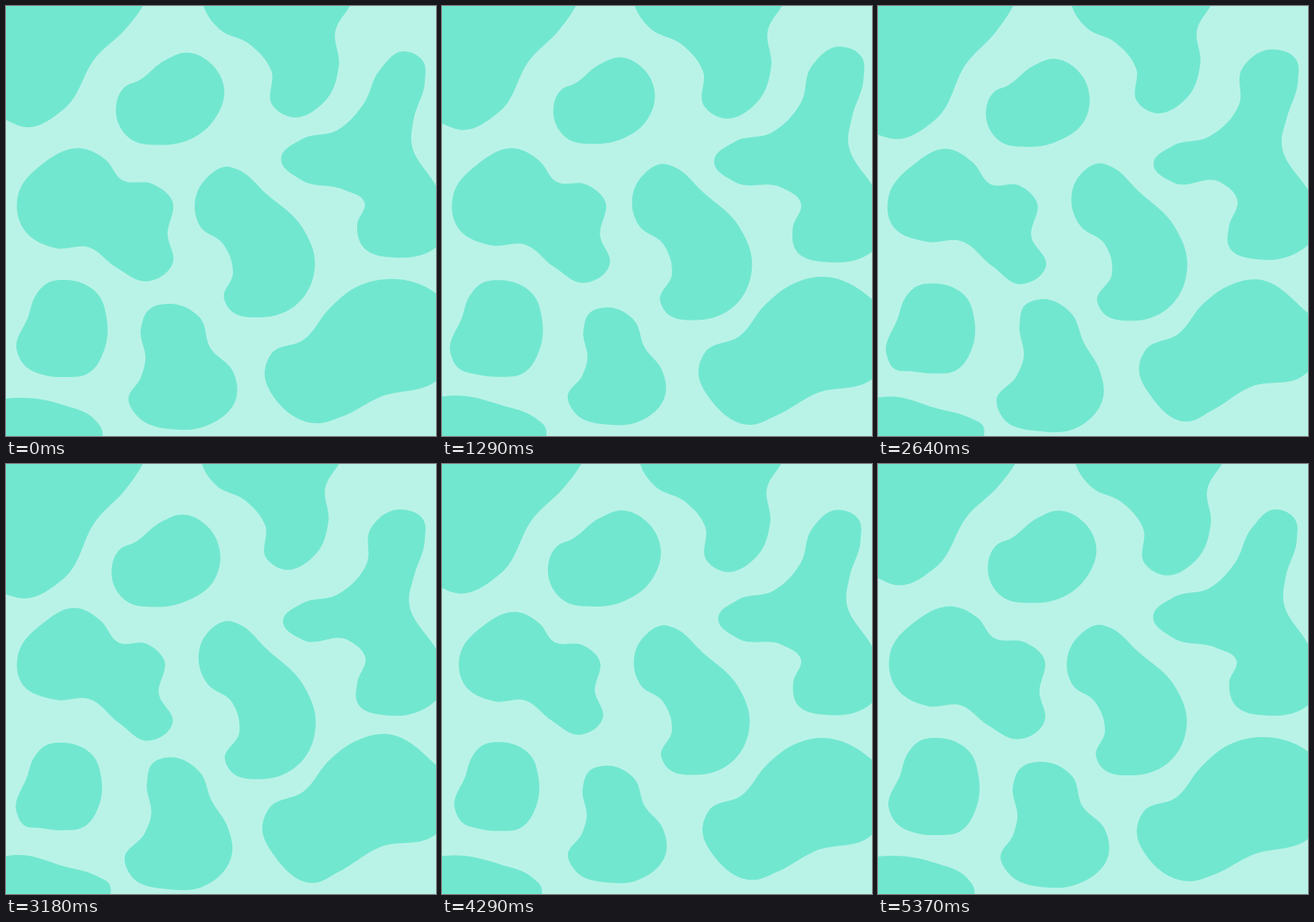
An HTML page with a canvas that plays this animation: 540 by 540 pixels, repeating every 5.4 s.

```html
<!DOCTYPE html>
<html lang="en">
<head>
<meta charset="utf-8">
<title>Drifting blobs</title>
<style>
html, body { margin: 0; width: 100%; height: 100%; overflow: hidden; background: #b9f3e7; }
canvas { display: block; width: 540px; height: 540px; }
</style>
</head>
<body>
<canvas id="stage" width="540" height="540"></canvas>
<script>
const LOOP = 5400, STEP = 30;
const KEY_TIMES = [0, 1290, 2070, 3180, 3780, 4770];
const ctx = document.getElementById('stage').getContext('2d');
const blobs = [];

// Points are [x, y, pullX, pullY]; the bend adds the pulls plus a common shift and growth.
function blob([a, b, c, d], [shiftX = 0, shiftY = 0, growX = 0, growY = 0], points) {
  const middle = i => {
    const v = points.map(p => p[i]);
    return (Math.min(...v) + Math.max(...v)) / 2;
  };
  const cx = middle(0), cy = middle(1);
  const outline = points.map(([x, y, px = 0, py = 0]) => ({
    x: x - cx, y: y - cy,
    dx: px + shiftX + (x - cx) * growX,
    dy: py + shiftY + (y - cy) * growY
  }));
  blobs.push({ cx, cy, outline, sizes: [1, a, b, 1, c, d] });
}

blob([.953, .952, 1.036, 1.03], [0, 6, 0, .11], [
  [172, 0], [150, 29], [114, 63], [72, 130], [24, 152, -6], [0, 143, 0, 5],
  [-60, 90], [-40, -40], [180, -15]]);

blob([1.045, 1.043, .982, .993], [-9.6, -1.2, -.065, -.05], [
  [248, 0], [268, 29], [306, 48], [333, 81], [335, 125], [356, 139],
  [401, 119], [418, 75], [414, 30], [432, 0], [485, -89], [245, -30]]);

blob([.936, .916, 1.047, 1.025], [-5.5, 5], [
  [138, 130], [150, 101], [166, 94], [200, 68], [228, 58.5], [257, 72],
  [274, 104], [262, 142, 6, -3], [230, 168], [194, 174.5], [155, 166]]);

blob([1.013, 1.026, .94, .929], [0, 2], [
  [96, 179, -6], [125, 193, -6, 2], [145, 218, -4, 4], [185, 224, -8],
  [208, 243, -10], [203, 287, -11], [209, 324], [179, 345.5], [138, 328, 5, -4],
  [104, 303, 0, -10], [62, 304, 0, -10], [22, 280, -3, -8], [15, 238], [45, 199]]);

blob([1.012, .986, 1, .957], [1, 0, 0, .05], [
  [280, 202], [290, 205], [327, 236], [372, 278], [388, 324], [368, 372],
  [320, 391], [280, 380], [274, 368], [285, 335, 7], [272, 298, 10],
  [244, 277, 8], [237, 250, 4], [252, 216]]);

blob([1.047, 1.041, .995, .998], [], [
  [500, 57, -5], [524, 70], [526, 95], [512, 142], [509, 170, -3], [540, 226, 0, 6],
  [560, 265], [540, 303, 0, -6], [494, 316, -12], [446, 299, -5], [441, 275],
  [450, 246, 1, -4], [425, 231, 4, -10], [370, 218, 3, 3], [345.5, 192, 2.5, 5],
  [371, 167.5, 0, 8], [416, 156, 0, 8], [449, 123, 4, 2], [469, 81, -11]]);

blob([1.01, .918, 1.005, .95], [-3, -4], [
  [478, 343], [540, 361, 3, 21], [575, 420], [540, 471], [470, 491, 3, -6],
  [421, 516], [392, 524, -2, 6], [340, 496], [325, 458], [333, 437],
  [374, 419, 3, -4], [407, 379, 3, -4], [440, 353]]);

blob([1.048, 1.07, .95, .966], [-3.5, 0, -.06, -.1], [
  [74, 344], [98, 349], [117, 364], [126, 390], [124, 430], [102, 462], [75, 466],
  [46, 463], [23, 451, 0, 7], [13.5, 432, 0, 8], [28, 390], [37, 364], [52, 348]]);

blob([.909, .975, .947, .904], [0, -1.5, 0, .05], [
  [203, 374], [243, 391], [257, 430, 1, -5], [285, 459, -6], [290, 488, -6],
  [243, 530], [216, 532, -7], [164, 514, -8], [154, 496, -5], [170, 465, 4],
  [175, 445, 7], [169.5, 404, 7.5], [180, 381, 4]]);

blob([1.037, 1.019, 1.003, 1], [0, -1], [
  [0, 493], [18, 492], [72, 501, 0, 5], [112, 520, 3, -1], [121, 534, 9, -5],
  [118, 552, 10], [40, 608], [-121, 540]]);

// Smooth periodic curve through the values at KEY_TIMES.
function track(values, t) {
  const n = values.length;
  const time = i => KEY_TIMES[(i + n) % n] + Math.floor(i / n) * LOOP;
  const value = i => values[(i + n) % n];
  const slope = i => (value(i + 1) - value(i - 1)) / (time(i + 1) - time(i - 1));
  let i = n - 1;
  while (KEY_TIMES[i] > t) i--;
  const span = time(i + 1) - time(i), u = (t - time(i)) / span, v = 1 - u;
  return value(i) * (1 + 2 * u) * v * v + value(i + 1) * (3 - 2 * u) * u * u
    + span * u * v * (slope(i) * v - slope(i + 1) * u);
}

function bend(t) {
  const wave = x => 1 - Math.cos(2 * Math.PI * x / LOOP);
  return wave(t) / wave(KEY_TIMES[3]);
}

// Closed curve; each tangent follows the circle through three neighbours.
function fillSmooth(p) {
  const n = p.length;
  const gap = (a, b) => Math.hypot(b.x - a.x, b.y - a.y);
  const tangents = p.map((b, i) => {
    const a = p[(i + n - 1) % n], c = p[(i + 1) % n];
    const before = gap(a, b), after = gap(b, c), w = after / before;
    const x = (b.x - a.x) * w + (c.x - b.x) / w;
    const y = (b.y - a.y) * w + (c.y - b.y) / w;
    const len = Math.hypot(x, y);
    return { x: x / len, y: y / len };
  });
  ctx.beginPath();
  ctx.moveTo(p[0].x, p[0].y);
  p.forEach((a, i) => {
    const j = (i + 1) % n, b = p[j], h = gap(a, b) * .35;
    const u = tangents[i], v = tangents[j];
    ctx.bezierCurveTo(a.x + u.x * h, a.y + u.y * h, b.x - v.x * h, b.y - v.y * h, b.x, b.y);
  });
  ctx.fill();
}

function drawBlob({ cx, cy, outline, sizes }, t) {
  const k = bend(t), s = track(sizes, t);
  fillSmooth(outline.map(p => ({
    x: cx + (p.x + p.dx * k) * s,
    y: cy + (p.y + p.dy * k) * s
  })));
}

const start = performance.now();

function frame() {
  const elapsed = Math.max(0, performance.now() - start) % LOOP;
  const t = Math.floor(elapsed / STEP) * STEP;
  ctx.fillStyle = '#b9f3e7';
  ctx.fillRect(0, 0, 540, 540);
  ctx.fillStyle = '#72e7d0';
  for (const b of blobs) drawBlob(b, t);
  requestAnimationFrame(frame);
}
frame();
</script>
</body>
</html>
```
